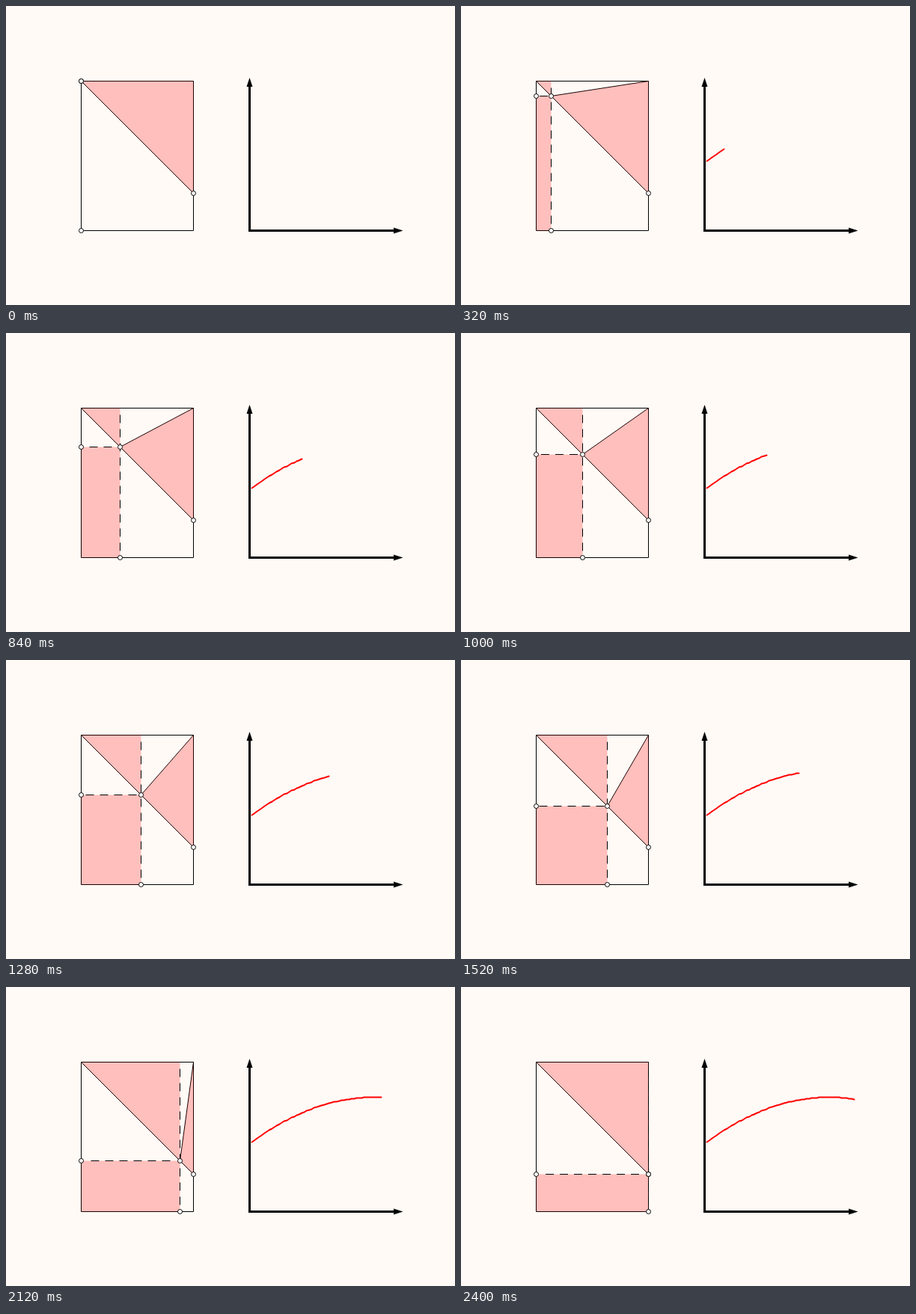
Write an HTML page that moves like this. It is 600 by 400 pixels and loops after 4800 ms.

```html
<!DOCTYPE html>
<html lang="en">
<head>
<meta charset="utf-8">
<title>Area under a moving point</title>
<style>
  html, body { margin: 0; width: 100%; height: 100%; overflow: hidden; background: #fffaf6; }
  svg { display: block; }
</style>
</head>
<body>
<svg width="600" height="400" viewBox="0 0 600 400">
  <rect width="600" height="400" fill="#fffaf6"/>
  <g transform="translate(.5 .5)" fill="none" stroke="#000">
    <path d="M100 100H250V300H100Z"/>
    <path id="slants"/>
    <path id="area" fill="#f00" fill-opacity=".235" stroke="none"/>
    <path id="dashes"/>
    <g fill="#fff">
      <circle id="left" r="3"/>
      <circle id="bottom" r="3"/>
      <circle cx="250" cy="250" r="3"/>
      <circle id="point" r="3"/>
    </g>
    <path d="M325 104V300H522" stroke-width="3"/>
    <path d="M325 95.5L329 107.5H321ZM530 300L517.5 296V304Z" fill="#000" stroke="none"/>
    <path id="curve" stroke="#f00" stroke-width="2" stroke-linecap="round" stroke-linejoin="round"/>
  </g>
</svg>
<script>
const LOOP = 4800, STEP = 40, STEPS = 60;
const WIDTH = 150, HEIGHT = 200, LEFT = 100, TOP = 100;
const DASH = 11, PERIOD = 19;
const el = id => document.getElementById(id);
const setPath = (id, d) => el(id).setAttribute("d", d);

function place(id, x, y) {
  el(id).setAttribute("cx", x);
  el(id).setAttribute("cy", y);
}

// Whole dashes, centred on a stretch of the given length
function dashStarts(length) {
  const n = Math.floor(length / PERIOD);
  const first = (length - n * PERIOD + PERIOD - DASH) / 2;
  return Array.from({ length: n }, (_, i) => first + i * PERIOD);
}

function graphPoint(k) {
  const x = k * WIDTH / STEPS;
  const area = (WIDTH - x) * WIDTH / 2 + x * x / 2 + x * (HEIGHT - x);
  return Math.floor(325 + x * 4 / 3 + 1e-6) + " " + Math.floor(300 - area / 125 + 1e-6);
}

function draw(time) {
  const k = Math.min(STEPS, Math.floor((time % LOOP) / STEP));
  const s = Math.floor(k * WIDTH / STEPS);
  const px = LEFT + s, py = TOP + s;

  setPath("slants", `M100 100L250 250M${px} ${py}L250 100`);
  setPath("area",
    `M${px} ${py}L250 100V250Z` +
    `M100 100H${px}V${py}Z` +
    `M100 ${py}H${px}V300H100Z`);
  setPath("dashes",
    dashStarts(s).map(d => `M${LEFT + d} ${py}h${DASH}`).join("") +
    dashStarts(HEIGHT).map(d => `M${px} ${TOP + d}v${DASH}`).join(""));

  place("left", LEFT, py);
  place("bottom", px, 300);
  place("point", px, py);

  const points = Array.from({ length: k }, (_, i) => graphPoint(i + 1));
  setPath("curve", k ? "M" + points.join("L") + (k === 1 ? "h.01" : "") : "");
}

let start = null;
function tick(now) {
  if (start === null) start = now;
  draw(now - start);
  requestAnimationFrame(tick);
}
draw(0);
requestAnimationFrame(tick);
</script>
</body>
</html>
```
